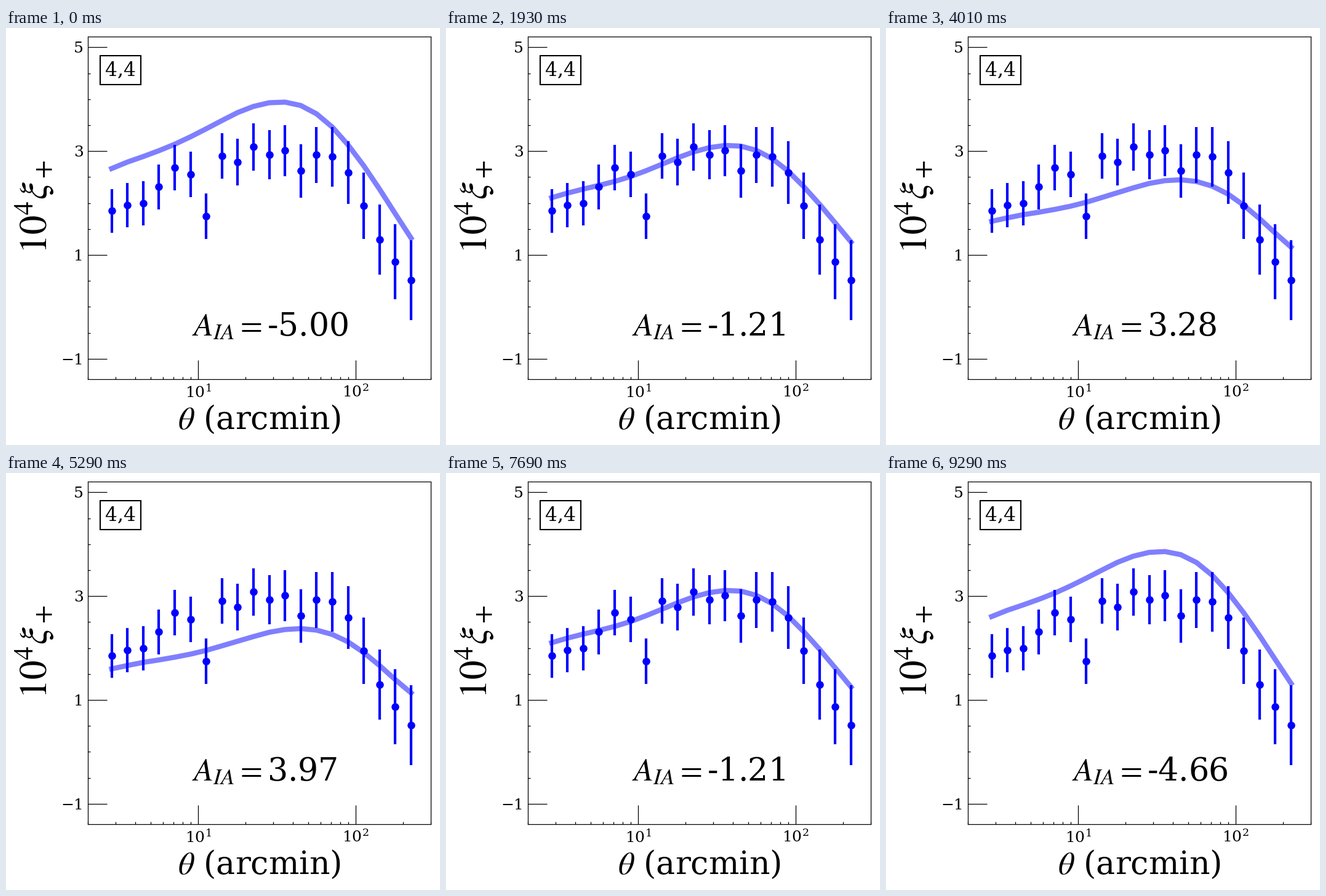
A matplotlib script for the animation above (9.45 s loop, 705x678 px).

```python
import numpy as np
import matplotlib.pyplot as plt
from matplotlib.animation import FuncAnimation
from matplotlib.ticker import FixedLocator, FuncFormatter, MultipleLocator, NullFormatter

W, H, DPI = 705, 678, 150
LOOP, TICK = 9450, 30          # ms
FIRST, HOLD = 330, 160         # ms on the first value, then on each other one
STEPS = 29                     # steps from -5 up to 5

plt.rcParams.update({
    "font.family": "DejaVu Serif",
    "mathtext.fontset": "stix",
    "axes.linewidth": 0.6,
})

# Measured correlation and its error, 0.1 dex apart
theta = 10 ** (0.4518 + 0.1 * np.arange(20))
xi = [1.847, 1.960, 1.995, 2.309, 2.682, 2.552, 1.746, 2.907, 2.789, 3.079,
      2.931, 3.008, 2.617, 2.925, 2.890, 2.588, 1.942, 1.296, 0.870, 0.514]
err = [0.420, 0.426, 0.428, 0.431, 0.433, 0.435, 0.438, 0.444, 0.450, 0.459,
       0.472, 0.490, 0.513, 0.540, 0.570, 0.602, 0.640, 0.680, 0.724, 0.770]

# The model is quadratic in the amplitude, so three curves fix it
knots = [-5, -1.207, 3.966]
curves = [
    [2.664, 2.789, 2.895, 3.008, 3.132, 3.275, 3.429, 3.589, 3.743, 3.861,
     3.932, 3.944, 3.879, 3.719, 3.464, 3.121, 2.718, 2.268, 1.794, 1.326],
    [2.102, 2.191, 2.268, 2.339, 2.416, 2.510, 2.623, 2.747, 2.872, 2.984,
     3.067, 3.109, 3.097, 3.014, 2.854, 2.617, 2.315, 1.977, 1.616, 1.249],
    [1.598, 1.663, 1.723, 1.770, 1.823, 1.882, 1.954, 2.042, 2.131, 2.220,
     2.303, 2.356, 2.374, 2.345, 2.262, 2.119, 1.912, 1.663, 1.391, 1.136],
]
quad, lin, const = np.polyfit(knots, curves, 2)


def model(a):
    return const + lin * a + quad * a * a


# The small margin keeps the pixel size from rounding down
fig = plt.figure(figsize=((W + 0.01) / DPI, (H + 0.01) / DPI), dpi=DPI,
                 facecolor="white")


def label(x, y, text, size, **kw):
    """Text at a pixel position counted from the top left."""
    return fig.text(x / W, 1 - y / H, text, fontsize=size, **kw)


ax = fig.add_axes([133 / W, 1 - 571.5 / H, 557 / W, 557 / H])
ax.set_xscale("log")
ax.set_xlim(2, 300)
ax.set_ylim(-1.4, 5.2)
ax.yaxis.set_major_locator(FixedLocator([-1, 1, 3, 5]))
ax.yaxis.set_minor_locator(MultipleLocator(0.5))
ax.xaxis.set_major_formatter(
    FuncFormatter(lambda v, _: r"$\mathdefault{10^{%d}}$" % round(np.log10(v))))
ax.xaxis.set_minor_formatter(NullFormatter())
ax.tick_params(which="major", direction="in", length=15, width=0.6, labelsize=12)
ax.tick_params(which="minor", direction="in", length=2, width=0.6)

line, = ax.plot(theta, model(-5), color="blue", alpha=0.5, lw=4)
ax.errorbar(theta, xi, yerr=err, fmt="o", color="blue", ms=6, elinewidth=2, mew=0)

label(161, 77, "4,4", 15, bbox=dict(facecolor="white", edgecolor="black", lw=1))
label(412, 652, r"$\theta$ (arcmin)", 25, ha="center", va="baseline")
label(67, 291, r"$10^4\xi_+$", 30, rotation=90, rotation_mode="anchor",
      ha="center", va="baseline")
value = label(302, 500, "", 25, va="baseline")


def update(i):
    t = i * TICK + 20
    step = max(0, (t - FIRST) // HOLD + 1)
    step = min(step, 2 * STEPS - step)
    a = -5 + 10 * step / STEPS
    line.set_ydata(model(a))
    value.set_text(r"$A_{IA}=$%.2f" % a)
    return line, value


anim = FuncAnimation(fig, update, frames=LOOP // TICK, interval=TICK,
                     repeat=True, repeat_delay=0)
plt.show()
```
